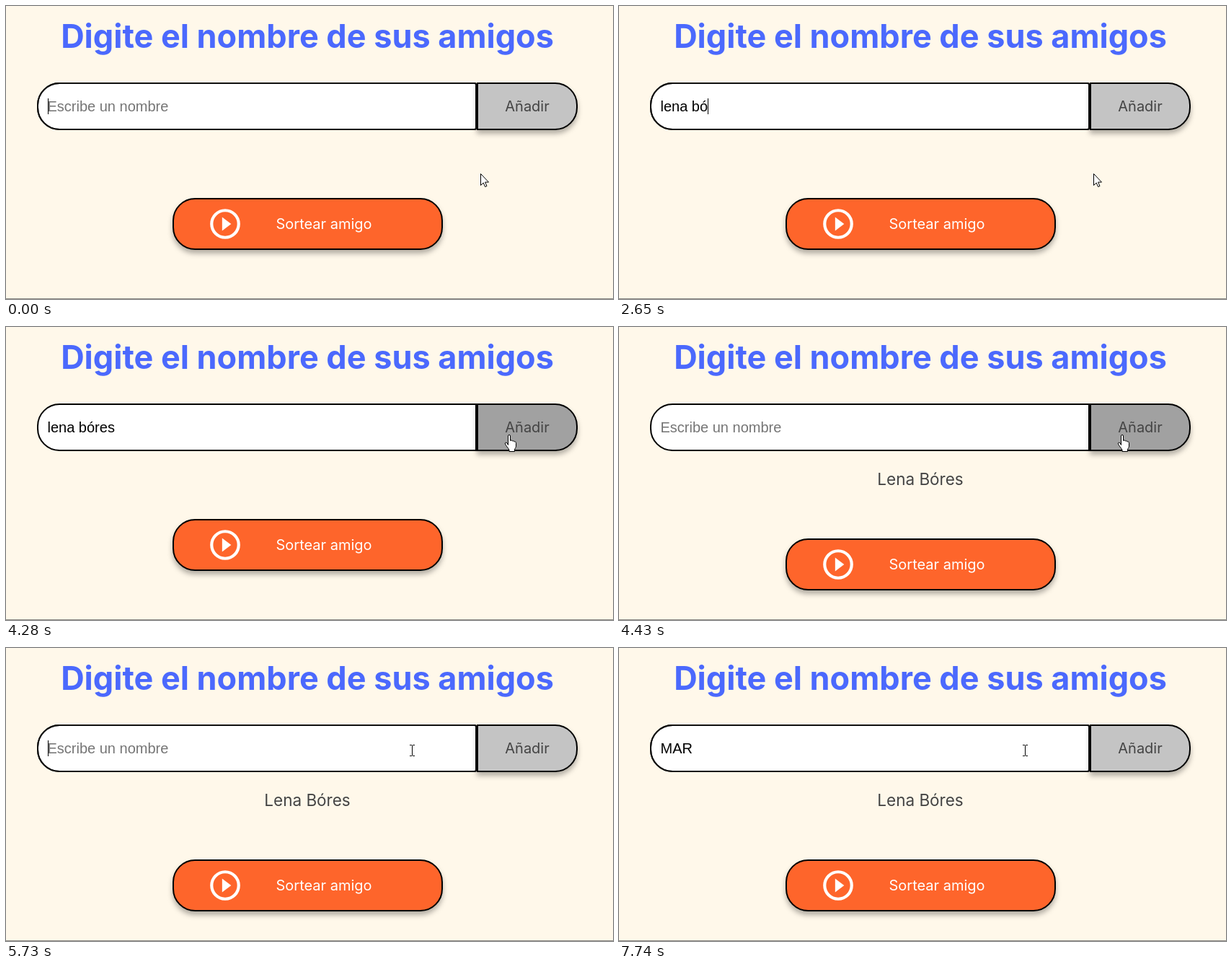
Recreate the animation shown at these times as an HTML page. Size 842 px wide and 406 px high, loop 8000 ms.

```html
<!DOCTYPE html>
<html lang="es">
<head>
<meta charset="utf-8">
<title>Sorteo de amigos</title>
<style>
  html, body { margin: 0; width: 100%; height: 100%; overflow: hidden; background: #fff8ea; }
  svg { display: block; width: 842px; height: 406px; }
  text { font: 20px Inter, sans-serif; font-optical-sizing: none; fill: #444; white-space: pre; }
  .mid { text-anchor: middle; }
  .title { font-size: 45px; font-weight: 700; fill: #4b69fd; }
  .item { font-size: 22.5px; }
  .field { font-family: "Liberation Sans", Arial, sans-serif; }
  .box { stroke: #000; stroke-width: 2; }
  .raised { filter: drop-shadow(0 5px 3.75px rgba(0, 0, 0, .3)); }
  .cursor { fill: #fff; stroke: #000; stroke-linejoin: round; }
</style>
</head>
<body>
<svg viewBox="0 0 842 406">
  <rect width="842" height="406" fill="#fff8ea"/>
  <rect y="405" width="842" height="1" fill="#8c8a85"/>
  <text class="mid title" x="418" y="58">Digite el nombre de sus amigos</text>

  <path id="input" class="box" fill="#fff"/>
  <path id="add" class="box raised" d="M654 107h107.75a30.25 30.25 0 0 1 30.25 30.25v3.5a30.25 30.25 0 0 1 -30.25 30.25h-107.75z"/>
  <path id="focus" fill="none" stroke="#101010" stroke-width="2"/>
  <text class="mid" x="723" y="146">Añadir</text>
  <text id="typed" class="field" x="57.5" y="146"></text>
  <rect id="caret" y="128" width="1" height="22"/>

  <text id="friend" class="mid item" x="418" y="219">Lena Bóres</text>

  <g id="draw">
    <rect class="box raised" x="232" y="267" width="373" height="70" rx="30.25" fill="#fe652b"/>
    <circle cx="304" cy="302" r="18.75" fill="none" stroke="#fff" stroke-width="4.17"/>
    <path d="M299.8 292.6l12.5 9.4l-12.5 9.4z" fill="#fff"/>
    <text x="374.5" y="309" style="fill:#fff">Sortear amigo</text>
  </g>

  <path id="arrow" class="cursor" d="M.5 .5V16.5L4.2 13L6.6 18.5L9 17.5L6.6 12.1H11.5Z"/>
  <path id="hand" class="cursor" d="M5.5 14.5V2a1.5 1.5 0 0 1 3 0v6.5c1-.9 2.6-.5 3 .6c1-.6 2.4-.2 2.8 .9c1-.4 2.2 .2 2.2 1.5v4.5c0 2-1.5 3-2 5v2.5h-7.5v-2c-1-2.5-3.5-4.5-5.5-8.5c-.8-1.6 1.3-2.6 2.4-1.3z"/>
  <path id="beam" fill="none" stroke="#000" d="M0 .5h3M4 .5h3M3.5 1v14M0 15.5h3M4 15.5h3"/>
</svg>
<script>
const LOOP = 8000;
const $ = id => document.getElementById(id);
const show = (id, on) => $(id).setAttribute("visibility", on ? "visible" : "hidden");
const within = (t, from, to) => t >= from && t < to;

const words = [
  { text: "lena bóres", keys: [290, 590, 890, 1190, 1480, 1770, 2650, 2810, 2960, 3270], clear: 4430 },
  { text: "MAR", keys: [6910, 6910, 7200], clear: LOOP }
];
const caretOn = [[0, 2340], [2650, 3850], [5730, 6160], [6760, 7740]];
const focused = [[0, 4280], [5730, LOOP]];
const pointer = [
  [0, "arrow", 658, 232], [3850, "arrow", 689, 191],
  [4000, "hand", 690, 156], [4130, "hand", 691, 149], [4860, "hand", 648, 142],
  [5010, "beam", 570, 134], [5160, "beam", 560, 134]
];

// Field outline: round on the left, corner radius r on the right.
const fieldPath = r =>
  `M74.25 107H${652 - r}a${r} ${r} 0 0 1 ${r} ${r}V${171 - r}a${r} ${r} 0 0 1 ${-r} ${r}H74.25` +
  "a30.25 30.25 0 0 1 -30.25 -30.25v-3.5a30.25 30.25 0 0 1 30.25 -30.25z";
$("focus").setAttribute("d", fieldPath(2));

function typedAt(t) {
  const word = words.find(w => within(t, w.keys[0], w.clear));
  return word ? word.text.slice(0, word.keys.filter(k => k <= t).length) : "";
}

function render(t) {
  const any = spans => spans.some(([from, to]) => within(t, from, to));
  const text = typedAt(t), typed = $("typed"), hasFocus = any(focused);

  typed.textContent = text || "Escribe un nombre";
  typed.style.fill = text ? "#000" : "#757575";
  const width = text ? typed.getComputedTextLength() : 0;
  $("caret").setAttribute("x", Math.round(57.5 + width));
  show("caret", any(caretOn));

  $("input").setAttribute("d", fieldPath(hasFocus ? 2 : 0));
  show("focus", hasFocus);
  $("add").setAttribute("fill", within(t, 4000, 5010) ? "#a1a1a1" : "#c4c4c4");

  const added = t >= 4430;
  show("friend", added);
  $("draw").setAttribute("transform", `translate(0 ${added ? 27 : 0})`);

  const [, shape, x, y] = pointer.filter(p => p[0] <= t).pop();
  for (const id of ["arrow", "hand", "beam"]) show(id, id === shape);
  $(shape).setAttribute("transform", `translate(${x} ${y})`);
}

const start = performance.now();
function tick() {
  render((performance.now() - start) % LOOP);
  requestAnimationFrame(tick);
}
tick();
</script>
</body>
</html>
```
